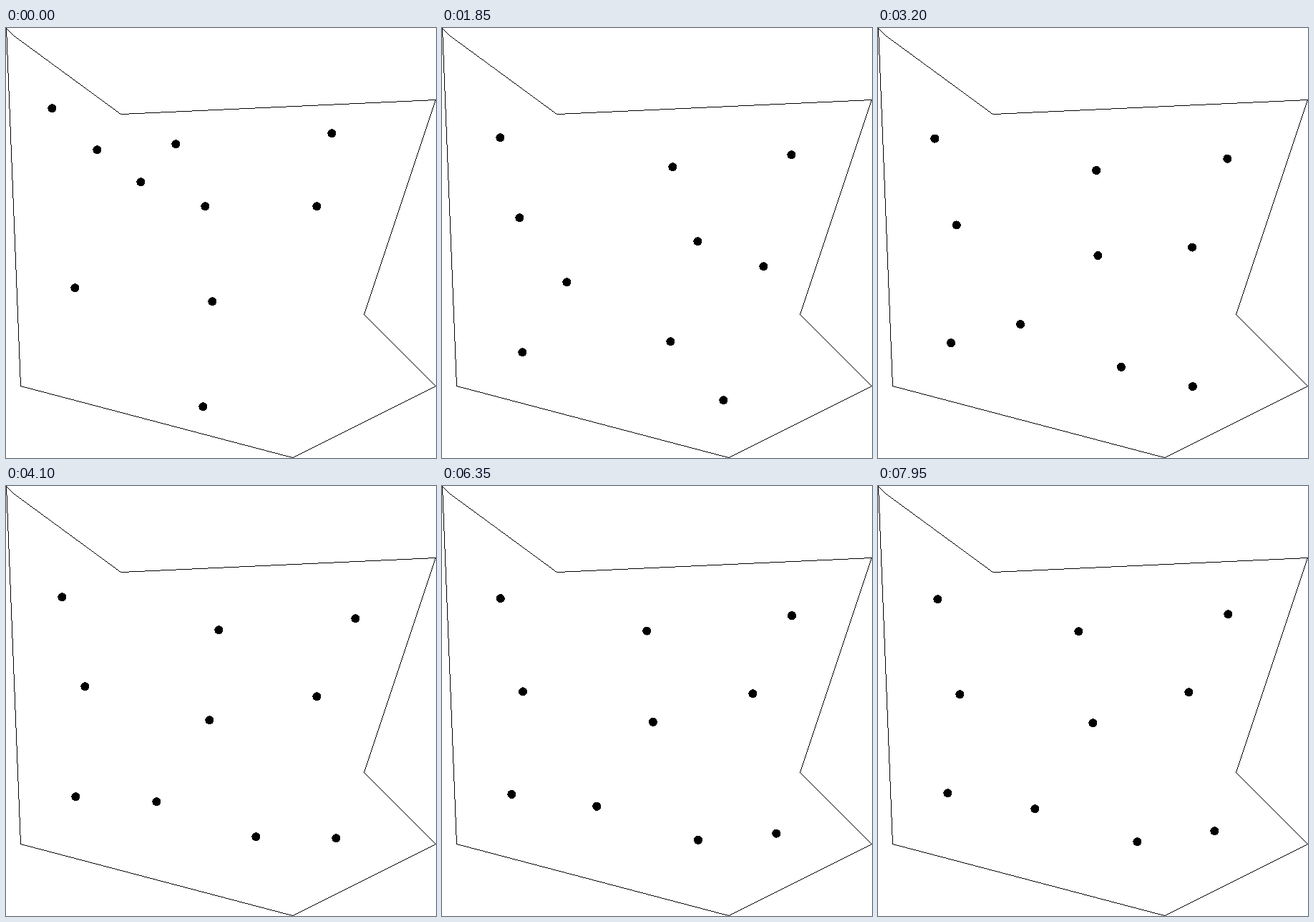
An HTML page with a canvas for the animation above (8000 ms loop, 601 by 601 pixels).

```html
<!DOCTYPE html>
<html lang="en">
<head>
<meta charset="utf-8">
<title>Dots spreading in a polygon</title>
<style>
  html, body { margin: 0; width: 100%; height: 100%; overflow: hidden; background: #fff; }
  canvas { display: block; width: 100vw; height: 100vh; image-rendering: pixelated; }
</style>
</head>
<body>
<canvas id="stage" width="601" height="601"></canvas>
<script>
const LOOP = 8000, STEP = 50, SIZE = 601, RADIUS = 6;
const OUTLINE = [[0, 0], [10, 10], [160, 120], [600, 100], [500, 400], [600, 500], [400, 600], [20, 500]];

// Key points of each dot's trail, reached at the shared times below.
const TIMES = [0, 750, 1850, 4100, 7950];
const TRAILS = [
  "64,112 69,116 81,153 78,155 83,158",
  "127,170 76,215 108,265 110,280 114,291",
  "188,215 168,284 174,355 210,441 219,451",
  "237,162 288,195 322,194 297,201 280,203",
  "278,249 328,293 357,298 284,327 300,331",
  "455,147 492,195 488,177 488,185 489,179",
  "434,249 448,298 449,333 434,294 434,288",
  "96,363 109,408 112,453 97,434 97,429",
  "288,382 310,405 319,438 349,490 362,497",
  "275,529 312,484 393,520 461,492 470,482"
].map(trail => trail.split(" ").map(point => point.split(",").map(Number)));

const pen = document.getElementById("stage").getContext("2d");
const mix = (a, b, k) => a + (b - a) * k;

// The dots settle: steps shrink as time goes on.
const settle = time => Math.log(3 + time / STEP);

// Lines and discs are set pixel by pixel, to keep their edges hard.
function drawLine([x1, y1], [x2, y2]) {
  const count = Math.max(Math.abs(x2 - x1), Math.abs(y2 - y1));
  for (let i = 0; i <= count; i++) {
    pen.fillRect(Math.round(mix(x1, x2, i / count)), Math.round(mix(y1, y2, i / count)), 1, 1);
  }
}

function drawDisc(x, y) {
  for (let row = Math.floor(y - RADIUS); row <= y + RADIUS; row++) {
    const rise = row + 0.5 - y;
    if (Math.abs(rise) >= RADIUS) continue;
    const half = Math.sqrt(RADIUS ** 2 - rise ** 2);
    const left = Math.round(x - half);
    pen.fillRect(left, row, Math.round(x + half) - left, 1);
  }
}

function draw(time) {
  pen.fillStyle = "#fff";
  pen.fillRect(0, 0, SIZE, SIZE);
  pen.fillStyle = "#000";
  OUTLINE.forEach((corner, i) => drawLine(corner, OUTLINE[(i + 1) % OUTLINE.length]));

  const next = Math.max(1, TIMES.findIndex(key => key >= time));
  const start = settle(TIMES[next - 1]);
  const progress = (settle(time) - start) / (settle(TIMES[next]) - start);
  for (const trail of TRAILS) {
    const [from, to] = [trail[next - 1], trail[next]];
    drawDisc(mix(from[0], to[0], progress) + 0.4, mix(from[1], to[1], progress) + 0.2);
  }
}

const begin = performance.now();
function tick() {
  const time = (performance.now() - begin) % LOOP;
  draw(Math.floor(time / STEP) * STEP);
  requestAnimationFrame(tick);
}
tick();
</script>
</body>
</html>
```
